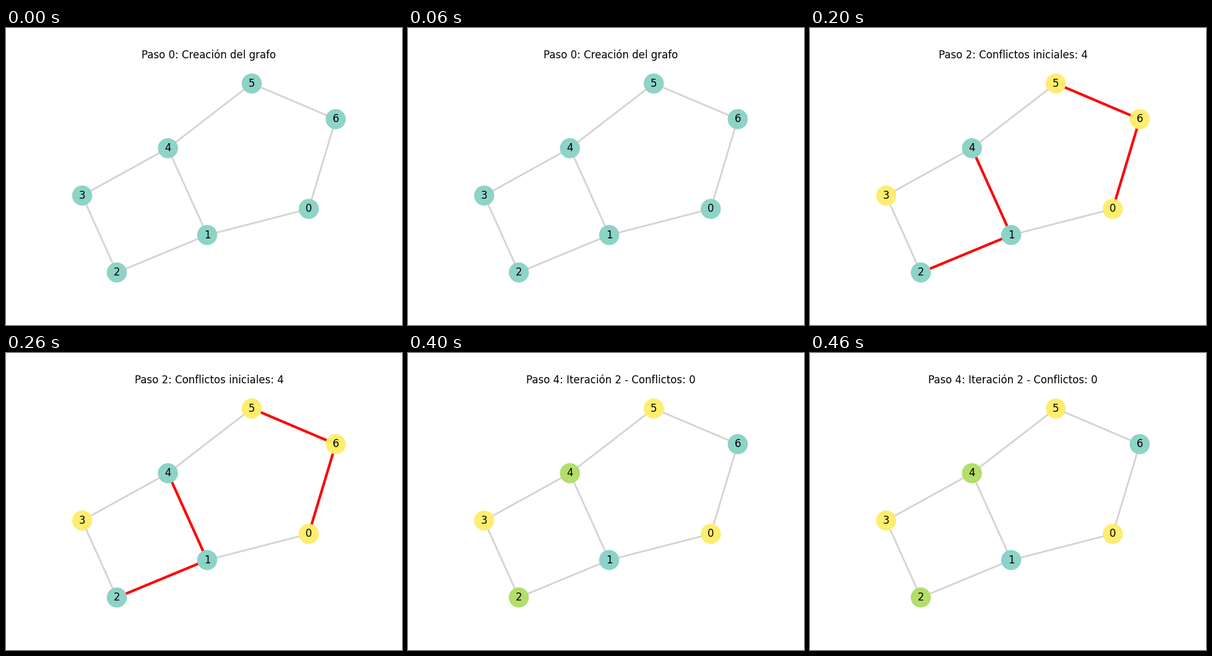
These frames come from a looping animation (640 px wide and 480 px high, 500 ms). A matplotlib script:

```python
import matplotlib.pyplot as plt
from matplotlib.animation import FuncAnimation

plt.rcParams["font.family"] = "DejaVu Sans"

W, H, DPI = 640, 480, 100
TEAL, GREEN, YELLOW = "#8dd3c7", "#b3de69", "#ffed6f"

NODES = [(489.3, 292.4), (325.1, 334.6), (179.1, 395.1), (123.1, 270.8),
         (261.7, 194.3), (397.2, 89.7), (532.9, 147.3)]
COUNT = len(NODES)
# A ring of nodes with one chord across it
EDGES = [(n, (n + 1) % COUNT) for n in range(COUNT)] + [(1, 4)]


def clashes(colors):
    return [colors[a] == colors[b] for a, b in EDGES]


def recolor(colors, nodes, color):
    return [color if n in nodes else c for n, c in enumerate(colors)]


def build_steps():
    """Return (caption, node colours, clashing edges) for each step."""
    plain = [TEAL] * COUNT
    colors = recolor(plain, {0, 3, 5, 6}, YELLOW)
    marks = clashes(colors)
    steps = [("Creación del grafo", plain, [False] * len(EDGES)),
             ("Asignación aleatoria de colores", colors, marks),
             (f"Conflictos iniciales: {sum(marks)}", colors, marks)]
    for turn, (nodes, color) in enumerate([({2, 4}, GREEN), ({6}, TEAL)], 1):
        colors = recolor(colors, nodes, color)
        marks = clashes(colors)
        caption = f"Iteración {turn} - Conflictos: {sum(marks)}"
        steps.append((caption, colors, marks))
    return steps


STEPS = build_steps()

fig = plt.figure(figsize=(W / DPI, H / DPI), dpi=DPI, facecolor="white")
ax = fig.add_axes([0, 0, 1, 1])
ax.set_xlim(0, W)
ax.set_ylim(H, 0)
ax.axis("off")

title = ax.text(328, 49.3, "", fontsize=12, ha="center", va="baseline")
lines = [ax.plot(*zip(NODES[a], NODES[b]), solid_capstyle="butt", zorder=1)[0]
         for a, b in EDGES]
dots = ax.scatter(*zip(*NODES), s=500, linewidths=1, zorder=2)
for n, (x, y) in enumerate(NODES):
    ax.text(x, y, str(n), fontsize=12, ha="center", va="center", zorder=3)


def draw(step):
    caption, colors, marks = STEPS[step]
    title.set_text(f"Paso {step}: {caption}")
    dots.set_facecolor(colors)
    dots.set_edgecolor(colors)
    for line, clash in zip(lines, marks):
        line.set_color("red" if clash else "lightgray")
        line.set_linewidth(3 if clash else 2)
    return [title, dots, *lines]


anim = FuncAnimation(fig, draw, frames=len(STEPS), interval=100,
                     repeat=True, repeat_delay=0, blit=False)
plt.show()
```
